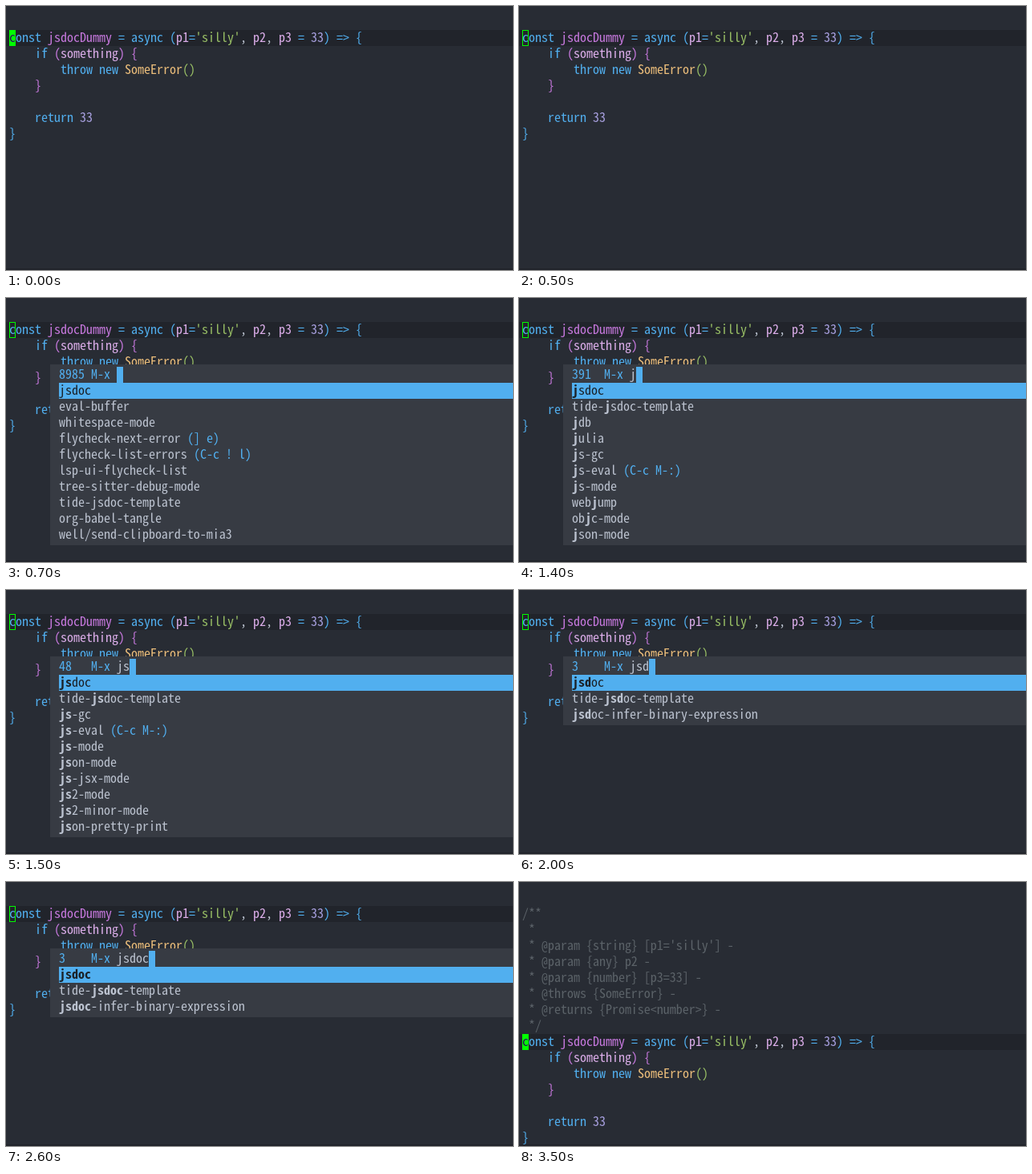
Write an HTML page that moves like this. It is 632 px wide and 330 px high and loops after 8000 ms.

```html
<!DOCTYPE html>
<html lang="en">
<head>
<meta charset="utf-8">
<title>jsdoc command</title>
<style>
  html, body { margin: 0; width: 100%; height: 100%; overflow: hidden; background: #282c34; }
  svg { display: block; width: 632px; height: 330px; }
  text {
    font-family: "Noto Sans Mono CJK JP", "Noto Sans Mono CJK SC", "Noto Sans Mono", monospace;
    font-variant-ligatures: none;
    white-space: pre;
  }
</style>
</head>
<body>
<svg id="stage" viewBox="0 0 632 330"></svg>
<script>
const NS = "http://www.w3.org/2000/svg";
const stage = document.getElementById("stage");
const CELL = 8, ROW = 20, LEFT = 4, TOP = 30, LOOP = 8000;

const COLORS = {
  f: "#bbc2cf", b: "#51afef", m: "#c678dd", v: "#dcaeea", g: "#98be65",
  y: "#ecbe7b", n: "#a9a1e1", c: "#5b6268", d: "#1b2229"
};

// Runs are separated by "|"; the first letter of each run is its colour.
const CODE = [
  "bconst |mjsdocDummy|b = async (|vp1|b=|g'silly'|f, |vp2|f, |vp3|b = |n33|b) => {",
  "b    if |m(|vsomething|m) {",
  "b        throw new |ySomeError|g()",
  "m    }",
  "",
  "b    return |n33",
  "b}"
];

const DOC = [
  "/**", " *", " * @param {string} [p1='silly'] -", " * @param {any} p2 -",
  " * @param {number} [p3=33] -", " * @throws {SomeError} -",
  " * @returns {Promise<number>} -", " */"
].map(line => "c" + line);

const RECENT = [
  "jsdoc", "eval-buffer", "whitespace-mode", "flycheck-next-error (] e)",
  "flycheck-list-errors (C-c ! l)", "lsp-ui-flycheck-list", "tree-sitter-debug-mode",
  "tide-jsdoc-template", "org-babel-tangle", "well/send-clipboard-to-mia3"
];
const FOR_J = [
  "jsdoc", "tide-jsdoc-template", "jdb", "julia", "js-gc", "js-eval (C-c M-:)",
  "js-mode", "webjump", "objc-mode", "json-mode"
];
const FOR_JS = [
  "jsdoc", "tide-jsdoc-template", "js-gc", "js-eval (C-c M-:)", "js-mode",
  "json-mode", "js-jsx-mode", "js2-mode", "js2-minor-mode", "json-pretty-print"
];
const FOR_JSD = ["jsdoc", "tide-jsdoc-template", "jsdoc-infer-binary-expression"];

const STATES = [
  { at: 0 },
  { at: 500, hollow: true },
  { at: 600, popup: { items: [] } },
  { at: 700, popup: { count: 8985, typed: "", items: RECENT } },
  { at: 1400, popup: { count: 391, typed: "j", items: FOR_J } },
  { at: 1500, popup: { count: 48, typed: "js", items: FOR_JS } },
  { at: 2000, popup: { count: 3, typed: "jsd", items: FOR_JSD } },
  { at: 2300, popup: { count: 3, typed: "jsdo", items: FOR_JSD } },
  { at: 2600, popup: { count: 3, typed: "jsdoc", items: FOR_JSD } },
  { at: 3500, doc: true }
];

function add(parent, tag, attrs) {
  const el = document.createElementNS(NS, tag);
  for (const key in attrs) el.setAttribute(key, attrs[key]);
  return parent.appendChild(el);
}

function rect(parent, x, y, width, height, fill) {
  return add(parent, "rect", { x, y, width, height, fill });
}

// Font size whose character advance equals one cell.
function cellFontSize() {
  const probe = add(stage, "text", { "font-size": 16 });
  probe.textContent = "m".repeat(20);
  const advance = probe.getComputedTextLength() / 20;
  probe.remove();
  return 16 * CELL / (advance || CELL);
}
const fontSize = cellFontSize();

// Returns the x position after the text.
function write(parent, x, top, str, color, bold) {
  const indent = str.length - str.trimStart().length;
  const el = add(parent, "text", {
    x: x + indent * CELL, y: top + 15, fill: COLORS[color],
    "font-size": fontSize, "font-weight": bold ? 700 : 400
  });
  el.textContent = str.trim();
  return x + str.length * CELL;
}

function writeRuns(parent, x, top, line) {
  for (const run of line.split("|")) {
    if (run) x = write(parent, x, top, run.slice(1), run[0]);
  }
}

function drawItem(parent, x, top, item, typed, selected) {
  const [name, ...keys] = item.split(" ");
  const color = selected ? "d" : "f";
  const start = typed ? name.indexOf(typed) : -1;
  if (start < 0) {
    x = write(parent, x, top, name, color);
  } else {
    const end = start + typed.length;
    x = write(parent, x, top, name.slice(0, start), color);
    x = write(parent, x, top, typed, color, true);
    x = write(parent, x, top, name.slice(end), color);
  }
  if (keys.length) write(parent, x, top, " " + keys.join(" "), "b");
}

function drawPopup(parent, { count, typed, items }) {
  const x = 66, y = 86;
  rect(parent, 55, y - 3, 577, (items.length + 1) * ROW + 6, "#373b43");
  if (!count) return;
  let end = write(parent, x, y, String(count).padEnd(5) + "M-x ", "b");
  end = write(parent, end, y, typed, "f");
  rect(parent, end, y, CELL, ROW, COLORS.b);
  rect(parent, x, y + ROW, 632 - x, ROW, COLORS.b);
  items.forEach((item, i) => drawItem(parent, x, y + (i + 1) * ROW, item, typed, i === 0));
}

function drawState({ doc, hollow, popup }) {
  const group = add(stage, "g", { display: "none" });
  const lines = doc ? DOC.concat(CODE) : CODE;
  const current = TOP + (doc ? DOC.length * ROW : 0);
  const focused = !hollow && !popup;
  rect(group, 0, current, 632, ROW, "#21242b");
  rect(group, 0, 328, 632, 2, "#21242b");
  if (focused) rect(group, LEFT, current, CELL, ROW, "#00ff00");
  lines.forEach((line, i) => writeRuns(group, LEFT, TOP + i * ROW, line));
  if (focused) {
    write(group, LEFT, current, "c", "d");
  } else {
    add(group, "rect", {
      x: LEFT + 0.5, y: current + 0.5, width: CELL - 1, height: ROW - 1,
      fill: "none", stroke: "#00ff00"
    });
  }
  if (popup) drawPopup(group, popup);
  return group;
}

rect(stage, 0, 0, 632, 330, "#282c34");
const groups = STATES.map(drawState);
let shown = -1;

function render(time) {
  const next = STATES.findLastIndex(state => state.at <= time);
  if (next === shown) return;
  groups.forEach((group, i) => group.setAttribute("display", i === next ? "inline" : "none"));
  shown = next;
}

const begin = performance.now();
function tick() {
  render((performance.now() - begin) % LOOP);
  requestAnimationFrame(tick);
}
tick();
</script>
</body>
</html>
```
